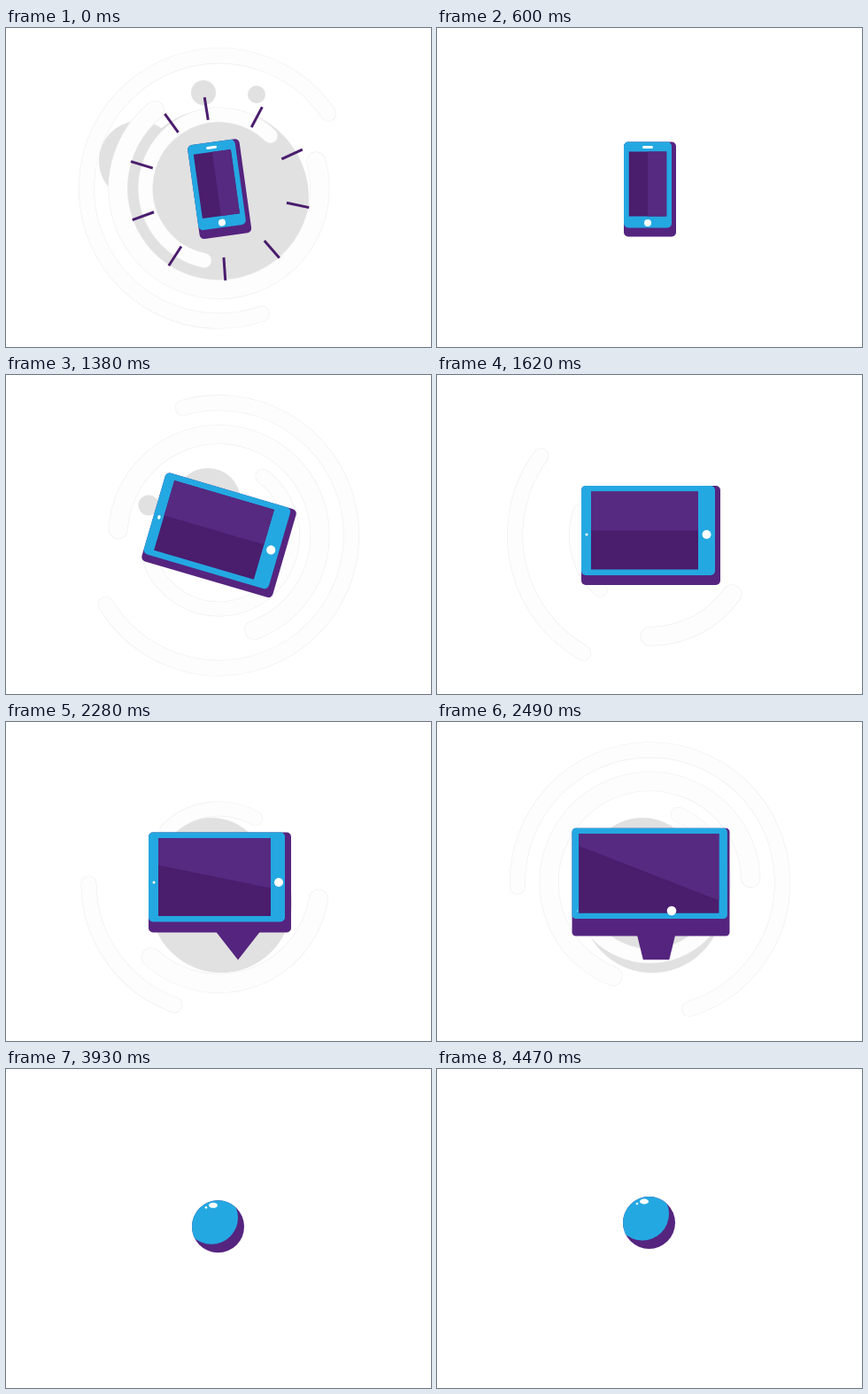
An HTML page with a canvas that plays this animation: 480 px wide and 360 px high, repeating every 4500 ms.

```html
<!DOCTYPE html>
<html lang="en">
<head>
<meta charset="utf-8">
<title>Devices</title>
<style>
html, body { margin: 0; width: 100%; height: 100%; overflow: hidden; background: #fff; }
canvas { display: block; }
</style>
</head>
<body>
<canvas id="stage" width="480" height="360"></canvas>
<script>
const ctx = document.getElementById('stage').getContext('2d');
const LOOP = 4500, RAD = Math.PI / 180, CX = 240.5, CY = 181;
const BLUE = '#24a8e2', PURPLE = '#55247f', DARK = '#4a1d6d', LIGHT = '#562a80', GREY = '#e1e1e1';

const mix = (a, b, p) => a + (b - a) * p;
const part = (t, from, to) => Math.min(1, Math.max(0, (t - from) / (to - from)));
const easeIn = p => p * p;
const easeOut = p => 1 - (1 - p) ** 2;
const easeInOut = p => p < .5 ? 2 * p * p : 1 - 2 * (1 - p) ** 2;
const smooth = p => p * p * (3 - 2 * p);

function circle(x, y, r, color) {
  ctx.fillStyle = color;
  ctx.beginPath();
  ctx.arc(x, y, r, 0, 7);
  ctx.fill();
}

function box(x, y, w, h, r, color) {
  ctx.fillStyle = color;
  ctx.beginPath();
  ctx.roundRect(x, y, w, h, r);
  ctx.fill();
}

// Each burst sweeps three rings, whose tails chase their heads, over grey puffs
const RINGS = [
  { r: 146, width: 18, sweep: 390, lead: 0 },
  { r: 114, width: 22, sweep: 372, lead: 55 },
  { r: 83, width: 17, sweep: 320, lead: 20 }
];
const BURSTS = [
  { start: -300, angles: [3, 239, 34], puffs: [[240, 192, 102], [150, 150, 45], [223, 73, 14], [283, 75, 10]] },
  { start: 1080, angles: [186, 78, 239], puffs: [[228, 142, 37], [161, 147, 11.5]] },
  { start: 2190, angles: [110, 6, 225], puffs: [[243, 203, 80], [232, 170, 62]] }
];

function drawBurst({ start, angles, puffs }, t) {
  const s = t - start;
  if (s < 0 || s >= 780) return;
  const grow = smooth(part(s, 0, 90)) * smooth(part(s, 500, 320));
  for (const [x, y, r] of puffs) circle(x, y, r * grow, GREY);
  ctx.lineCap = 'round';
  RINGS.forEach(({ r, width, sweep, lead }, i) => {
    const tail = sweep * easeInOut(part(s + lead, 100, 780));
    const head = sweep * smooth(part(s + lead, -30, 420));
    if (head - tail < .5) return;
    ctx.beginPath();
    ctx.arc(CX, CY, i ? r : r + s * .012, (angles[i] + tail) * RAD, (angles[i] + head) * RAD);
    for (const [w, color] of [[width, '#eee'], [width - 1.2, '#fdfdfd']]) {
      ctx.lineWidth = w;
      ctx.strokeStyle = color;
      ctx.stroke();
    }
  });
}

function drawTicks(t) {
  if (t > 240) return;
  const inner = mix(78, 118, t / 240), outer = mix(104, 118, t / 240);
  ctx.lineCap = 'butt';
  ctx.lineWidth = 3;
  ctx.strokeStyle = DARK;
  ctx.beginPath();
  for (let i = 0; i < 10; i++) {
    const a = (37 * i - 99) * RAD;
    ctx.moveTo(CX + Math.cos(a) * inner, CY + Math.sin(a) * inner);
    ctx.lineTo(CX + Math.cos(a) * outer, CY + Math.sin(a) * outer);
  }
  ctx.stroke();
}

// Poses lie on their side, with the button to the right
const phone = {
  x: 238, y: 177, w: 97, h: 54, angle: 90, scale: 1, corner: 5,
  screenW: 73, screenH: 42.5, shift: -1, tilt: 0,
  buttonX: 43, buttonY: 0, buttonR: 4, speaker: 12, depthX: 10, depthY: -5,
  footX: 25, footTop: 13, footBottom: 0, foot: 0
};
const swing = { ...phone, angle: 66, scale: 1.28, screenW: 76, depthX: 8, depthY: -2, speaker: 8 };
const tablet = {
  ...phone, x: 238.5, y: 175.5, w: 151, h: 101, angle: 0,
  screenW: 121, screenH: 88, shift: -4,
  buttonX: 66, buttonY: 4.5, buttonR: 5, speaker: 3, depthX: 6, depthY: 11
};
const bubble = {
  ...tablet, x: 238, y: 175, w: 154, screenW: 127, shift: -2.5, tilt: 11.6,
  buttonX: 70, buttonY: 6, depthX: 7, depthY: 12, footX: 24, footTop: 25, foot: 31
};
const monitor = {
  ...bubble, x: 241.5, y: 168.5, w: 188, h: 103, corner: 4,
  screenW: 177, screenH: 91, shift: 0, tilt: 27, speaker: 0,
  buttonX: -2, buttonY: 63.5, buttonR: 5.5, depthX: 0, depthY: 24,
  footX: -2.5, footTop: 19.5, footBottom: 23.5, foot: 24
};
const ball = {
  ...monitor, x: 239.5, y: 178, w: 59, h: 59, corner: 29.5, screenW: 0, screenH: 0,
  buttonX: -5, buttonY: -23, buttonR: 4, depthY: 0, footTop: 0, footBottom: 0, foot: 0
};
const MOVES = [
  { from: 0, to: 300, pose: phone, ease: easeOut },
  { from: 600, to: 1050, pose: { ...phone, angle: 97 }, ease: smooth },
  { from: 1080, to: 1200, pose: swing, ease: easeIn },
  { from: 1200, to: 1560, pose: tablet, ease: easeOut },
  { from: 2190, to: 2280, pose: bubble, ease: easeOut },
  { from: 2280, to: 2640, pose: monitor, ease: smooth },
  { from: 3300, to: 3720, pose: ball, ease: smooth }
];

function poseAt(t) {
  const pose = { ...phone, angle: 82 };
  for (const move of MOVES) {
    const p = move.ease(part(t, move.from, move.to));
    for (const key in pose) pose[key] = mix(pose[key], move.pose[key], p);
  }
  return pose;
}

function drawDevice(d) {
  const left = -d.w / 2, top = -d.h / 2, bottom = d.h / 2 + d.depthY;
  ctx.save();
  ctx.translate(d.x, d.y);
  ctx.rotate(d.angle * RAD);
  ctx.scale(d.scale, d.scale);

  if (d.foot > 0) {
    ctx.fillStyle = PURPLE;
    ctx.beginPath();
    ctx.moveTo(d.footX - d.footTop, bottom - 1);
    ctx.lineTo(d.footX + d.footTop, bottom - 1);
    ctx.lineTo(d.footX + d.footBottom, bottom + d.foot);
    ctx.lineTo(d.footX - d.footBottom, bottom + d.foot);
    ctx.fill();
  }
  box(left, top + Math.min(0, d.depthY), d.w + d.depthX, d.h + Math.abs(d.depthY), d.corner, PURPLE);
  box(left, top, d.w, d.h, d.corner, BLUE);

  ctx.save();
  ctx.beginPath();
  ctx.rect(d.shift - d.screenW / 2, -d.screenH / 2, d.screenW, d.screenH);
  ctx.clip();
  ctx.fillStyle = DARK;
  ctx.fillRect(-200, -200, 400, 400);
  ctx.rotate(d.tilt * RAD);
  ctx.fillStyle = LIGHT;
  ctx.fillRect(-200, -200, 400, 200);
  ctx.restore();

  circle(d.buttonX, d.buttonY, d.buttonR, '#fff');
  const thick = Math.min(3, d.speaker);
  box(left + 6 - thick / 2, d.buttonY - d.speaker / 2, thick, d.speaker, thick / 2, '#fff');
  ctx.restore();
}

function drawBall(t) {
  ctx.save();
  ctx.translate(239.5, 177.7 - 4.2 * Math.cos((t - 4470) / 309 * 2 * Math.PI));
  circle(0, 0, 29.5, PURPLE);
  ctx.clip();
  circle(-7.5, -10, 30, BLUE);
  circle(-13.5, -21.5, 1.3, '#fff');
  ctx.beginPath();
  ctx.ellipse(-5.5, -24, 5, 3, 0, 0, 7);
  ctx.fill();
  ctx.restore();
}

function draw(t) {
  ctx.fillStyle = '#fff';
  ctx.fillRect(0, 0, 480, 360);
  for (const burst of BURSTS) drawBurst(burst, t);
  drawTicks(t);
  if (t < 3720) drawDevice(poseAt(t));
  else drawBall(t);
}

const begin = performance.now();
function tick() {
  draw((performance.now() - begin) % LOOP);
  requestAnimationFrame(tick);
}
tick();
</script>
</body>
</html>
```
